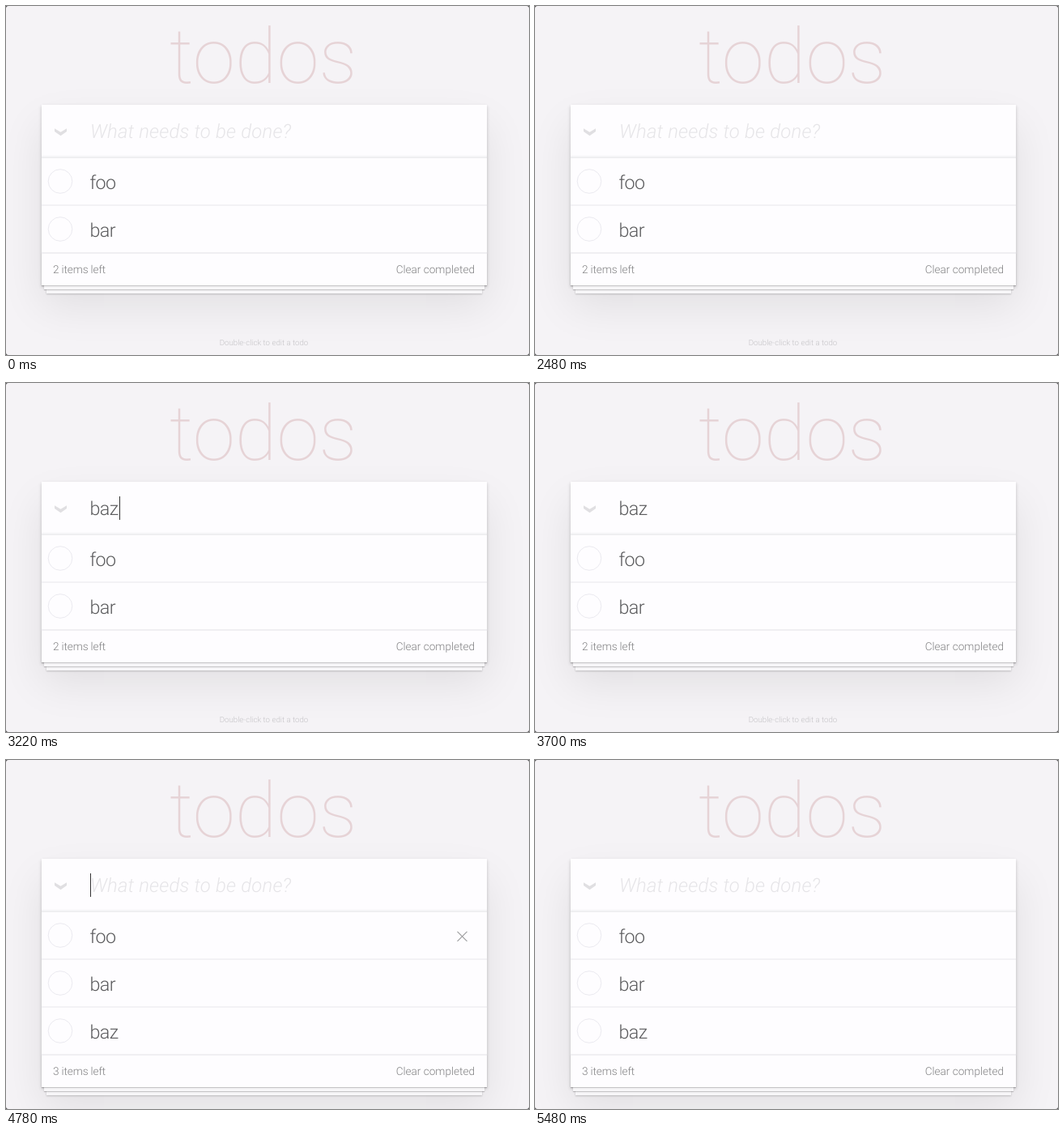
An HTML page for the animation above (6300 ms loop, 646 px wide and 431 px high).

```html
<!DOCTYPE html>
<html lang="en">
<head>
<meta charset="utf-8">
<title>todos</title>
<style>
html, body { margin: 0; width: 100%; height: 100%; overflow: hidden; background: #444; }
#stage { position: absolute; left: 0; top: 0; width: 646px; height: 431px; overflow: hidden; border-radius: 3px; background: #f5f3f6; }
#card, #stack { position: absolute; left: 44px; width: 550px; }
#card { top: 122px; background: #fefdff; box-shadow: 0 2px 4px rgba(0,0,0,.2), 0 25px 50px rgba(0,0,0,.085); }
#stack {
  height: 40px;
  box-shadow: 0 1px 1px rgba(0,0,0,.2), 0 8px 0 -3px #f7f6f8, 0 9px 1px -3px rgba(0,0,0,.2),
    0 16px 0 -6px #f7f6f8, 0 17px 2px -6px rgba(0,0,0,.2);
}
#head { position: absolute; left: 44px; top: 122px; width: 550px; height: 64px; box-shadow: inset 0 -2px 1px rgba(0,0,0,.02); }
svg { position: absolute; left: 0; top: 0; }
text { font-family: Roboto, Inter, sans-serif; font-weight: 300; text-rendering: geometricPrecision; white-space: pre; }
.title { font-size: 94.6px; font-weight: 100; fill: #e6d3d6; }
.item { font-size: 23.3px; letter-spacing: -.6px; fill: #5c5c5e; }
.hint { font-size: 24px; font-style: italic; letter-spacing: .15px; fill: #e6e5e8; }
.foot { font-size: 13.6px; fill: #808082; }
.info { font-size: 9.7px; fill: #c4c3c6; }
</style>
</head>
<body>
<div id="stage">
  <div id="card"></div>
  <div id="stack"></div>
  <div id="head"></div>
  <svg width="646" height="431" viewBox="0 0 646 431">
    <text class="title" x="317.7" y="95" text-anchor="middle">todos</text>
    <path d="M60 151.2 L67.5 155.8 L75 151.2 V155 L67.5 160.3 L60 155 Z" fill="#e0dfe2"/>
    <text id="hint" class="hint" x="104" y="163">What needs to be done?</text>
    <text id="draft" class="item" x="103.5" y="163"></text>
    <rect id="caret" y="140" width="1" height="29" fill="#333"/>
    <rect x="44" y="186.5" width="550" height="1" fill="#e2e1e4"/>
    <g id="rows"></g>
    <path id="cross" d="M557.5 211.8 l12 12 m0 -12 l-12 12" stroke="#a0a0a2" stroke-width="1.2" fill="none"/>
    <g id="footer">
      <rect x="44" y="304.5" width="550" height="1" fill="#e3e2e5"/>
      <text id="count" class="foot" x="58" y="330" letter-spacing="-.12"></text>
      <text class="foot" x="579" y="330" text-anchor="end">Clear completed</text>
      <text class="info" x="318.5" y="419" text-anchor="middle">Double-click to edit a todo</text>
    </g>
  </svg>
</div>
<script>
const LOOP = 6300, ROW = 59;
const $ = id => document.getElementById(id);
const show = (el, on) => el.setAttribute("visibility", on ? "visible" : "hidden");
const within = (t, from, to) => t >= from && t < to;

const typed = [2830, 2910, 3220], submit = 3910;
const caretX = [104, 117, 128, 140];
const caretOn = [[2000, 2480], [2830, 3700], [3910, 4390], [4780, 5480]];
const hover = [4780, 4830, 4895, 4960];

$("rows").innerHTML = ["foo", "bar", "baz"].map((name, i) => `
  <g transform="translate(0 ${i * ROW})">
    ${i ? '<rect x="44" y="186.5" width="550" height="1" fill="#e9e8eb"/>' : ""}
    <circle cx="67" cy="216.5" r="14.8" fill="none" stroke="#ebeaf0"/>
    <text class="item" x="103.5" y="225.5">${name}</text>
  </g>`).join("");
const lastRow = $("rows").lastElementChild;

function draw(t) {
  const added = t >= submit;
  const count = added ? 3 : 2;
  const chars = added ? 0 : typed.filter(at => t >= at).length;

  $("card").style.height = 105 + count * ROW + "px";
  $("stack").style.top = 187 + count * ROW + "px";
  $("footer").setAttribute("transform", `translate(0 ${(count - 2) * ROW})`);
  $("count").textContent = count + " items left";
  show(lastRow, added);

  show($("hint"), !chars);
  $("draft").textContent = "baz".slice(0, chars);
  $("caret").setAttribute("x", caretX[chars]);
  show($("caret"), caretOn.some(([from, to]) => within(t, from, to)));

  const row = hover.filter(at => t >= at).length - 1;
  show($("cross"), row >= 0 && row < 3);
  $("cross").setAttribute("transform", `translate(0 ${Math.max(row, 0) * ROW})`);
}

const start = performance.now();
function tick() {
  draw((performance.now() - start) % LOOP);
  requestAnimationFrame(tick);
}
tick();
</script>
</body>
</html>
```
